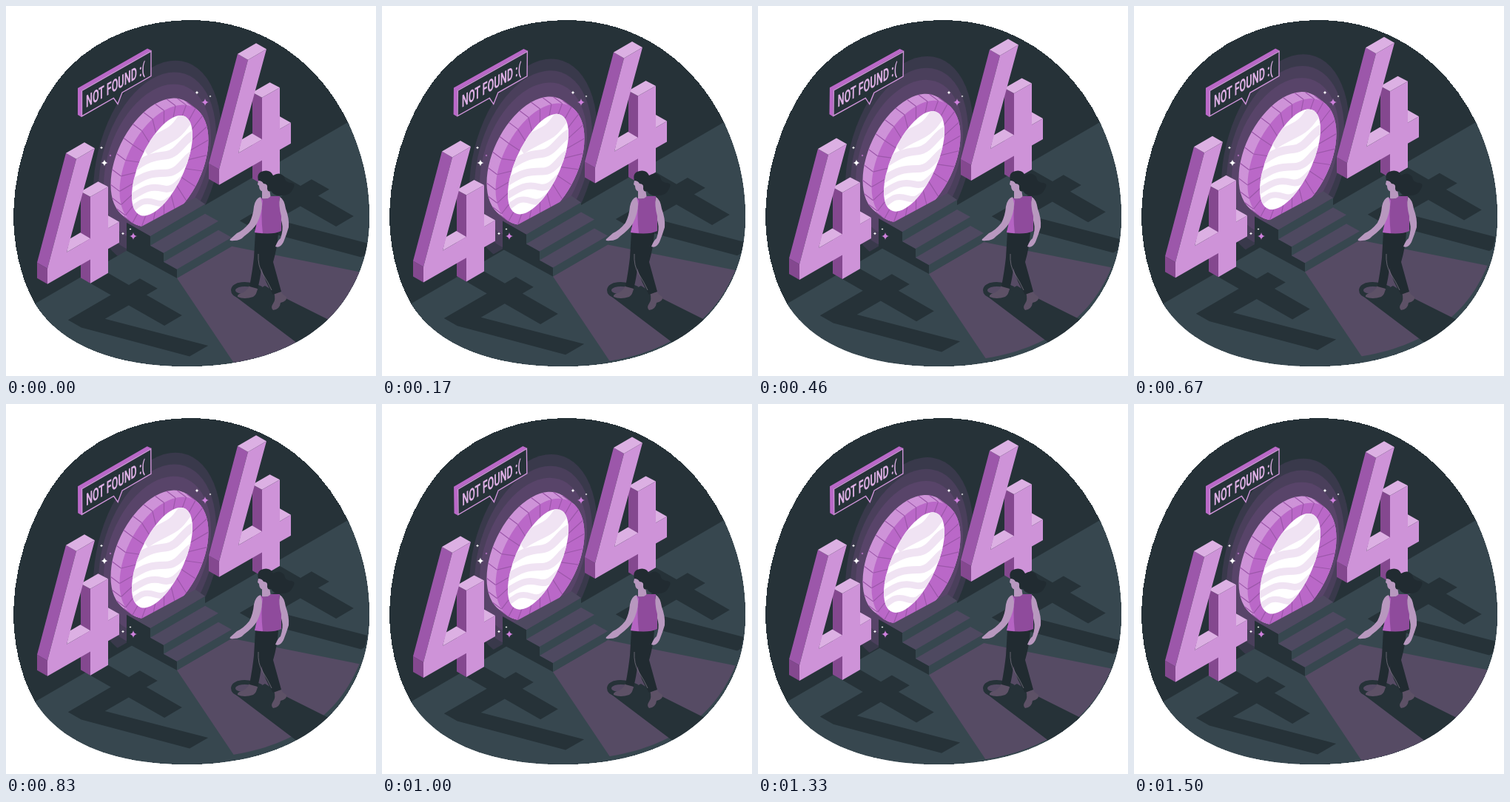
An HTML page that plays this animation: 500 by 500 pixels, repeating every 1.54 s.

```html
<!DOCTYPE html>
<html lang="en">
<head>
<meta charset="utf-8">
<title>404 Not Found</title>
<style>
  html, body { margin: 0; width: 100%; height: 100%; overflow: hidden; background: #fff; }
  svg { display: block; width: 100vw; height: 100vh; }
  text { font: 700 23px Roboto, sans-serif; fill: #ddafe4; }
  .dark { fill: #263238; }
  .floor { fill: #37474f; }
  .lit { fill: #564b64; }
  .tread { fill: #4e4960; }
  .top { fill: #dcb0e3; }
  .front { fill: #ce93d8; }
  .side { fill: #9c57aa; }
  .deep { fill: #84488f; }
  .skin { fill: #b898bf; }
  .hair { fill: #212b31; }
  .seam { fill: none; stroke: #9c57aa; stroke-width: 1.2; }
  .wave { fill: none; stroke: #f0e3f3; }
</style>
</head>
<body>
<svg viewBox="0 0 500 500">
  <defs>
    <path id="blob" d="M250 19C350 19 425 80 462 157C482 200 491 240 491 285C491 330 480 360 462 390C425 450 350 487 245 487C150 487 75 460 39 402C18 365 10 320 10 280C12 200 45 125 85 83C130 38 190 19 250 19Z"/>
    <clipPath id="inBlob"><use href="#blob"/></clipPath>
    <clipPath id="wall"><path d="M0 0H500V136L0 425Z"/></clipPath>
    <clipPath id="opening"><ellipse rx="41" ry="54" transform="translate(211 216) skewY(-45)"/></clipPath>
    <path id="fourFace" d="M56 376V355L95 207L120 192.5L82 333L114 314.5V258L138 244.5V300.6L153 292V320L138 328.5V361L114 375V342.7Z"/>
    <g id="four">
      <path class="deep" d="M101 251L114 258V375L101 367.5ZM42 347L56 355V376L42 368Z"/>
      <path class="side" d="M81 199L95 207L56 355L42 347Z"/>
      <path class="top" d="M81 199L106 184.5L120 192.5L95 207ZM101 251L124.5 237.5L138 244.5L114 258ZM82 333L114 314.5L100.5 306.5L86 315ZM138 300.6V283.5L153 292Z"/>
      <use href="#fourFace" class="front"/>
    </g>
    <use id="fourShadow" href="#fourFace" class="dark" transform="matrix(.507 -.86 -.855 -.49 376.9 656.8)"/>
    <path id="star" d="M0-1Q.15-.15 1 0Q.15.15 0 1Q-.15.15-1 0Q-.15-.15 0-1Z"/>
  </defs>

  <use href="#blob" class="dark" shape-rendering="crispEdges"/>
  <g clip-path="url(#inBlob)">
    <path class="floor" d="M0 425L500 135V500H0Z"/>
  </g>

  <g id="scene">
    <g clip-path="url(#inBlob)">
      <path class="lit" d="M231 368L305 325L520 368V520H333Z"/>
      <use href="#fourShadow"/>
      <use href="#fourShadow" x="232" y="-134"/>
    </g>
    <g clip-path="url(#wall)" fill="#ba68c8" fill-opacity=".13" id="halo"></g>
    <g id="portal"></g>
    <g clip-path="url(#opening)">
      <path fill="#fff" d="M160 130H260V300H160Z"/>
      <g class="wave">
        <path stroke-width="20" d="M256 144C236 152 240 164 222 174S200 184 186 194"/>
        <path stroke-width="11" d="M258 172C240 178 234 200 216 202S190 206 168 222"/>
        <path stroke-width="10" d="M258 198C240 204 236 226 216 226S188 228 164 244"/>
        <path stroke-width="9" d="M256 224C236 228 232 252 212 247S184 250 164 262"/>
        <path stroke-width="8" d="M240 252C222 254 220 272 202 266S180 268 166 278"/>
      </g>
    </g>
    <path class="dark" d="M163 293L195 311V324L213 334V346L231 356V368L163 331Z"/>
    <path class="floor" d="M195 311L269 268V281L195 324ZM213 334L287 291V303L213 346ZM231 356L305 313V325L231 368Z"/>
    <path class="tread" d="M178 301L256 259L269 268L195 311ZM195 324L269 281L287 291L213 334ZM213 346L287 303L305 313L231 356Z"/>
    <use href="#four"/>
    <use href="#four" x="232" y="-134"/>
  </g>

  <g id="stars"></g>

  <g id="sign">
    <path fill="#ba68c8" d="M97 111L191 57.5L196.5 60L102 114V150L97 147Z"/>
    <path class="dark" stroke="#ce93d8" stroke-width="1.4" d="M102.5 114.5L196 61V94.5L157 117L151 132.5L145.5 124.5L102.5 149Z"/>
    <text transform="matrix(.55 -.318 0 1 108 137.5)">NOT FOUND :(</text>
  </g>

  <g clip-path="url(#inBlob)">
    <path class="dark" d="M308 391L328 390L350 378L376 394L442 427L398 459Z"/>
    <path d="M345 382C325 372 307 376 307 384S320 393 336 393" fill="none" stroke="#263238" stroke-width="6"/>
  </g>

  <g id="woman">
    <path fill="#5d5166" d="M329 378L340 381Q339 390 334 393Q322 397 313 393Q312 390 318 388Q325 386 329 378ZM362 387L371 384Q373 390 379 393Q380 399 371 401Q370 410 361 411Q357 408 361 402Q365 397 362 387Z"/>
    <path class="hair" d="M337 305L368 306Q367 325 361 346L372 386L361 390Q350 373 345 354Q344 367 340 382L329 379Q333 358 335 340Z"/>
    <path d="M341 335Q340 351 347 362T359 384" fill="none" stroke="#77717f" stroke-width=".8"/>
    <path class="skin" d="M370 258Q376 261 378 274Q383 287 382 299Q379 309 375 319Q370 328 364 325Q367 317 371 314Q375 302 373 294L368 272Z"/>
    <path class="skin" d="M346 248L356 248L358 260L346 261Z"/>
    <path fill="#8f4b9c" d="M344 259Q352 263 358 257L370 257Q368 270 372 284V304Q360 310 336 306Q341 288 340 272Z"/>
    <path fill="#b564c3" d="M344 259L347 263Q344 281 347 307L336 306Q341 288 340 272Z"/>
    <path class="skin" d="M344 258Q337 260 335 271Q334 283 329 293Q321 303 312 307L303 315Q301 318 308 317Q317 317 322 311Q334 302 339 294Q346 280 346 267Z"/>
    <path class="skin" d="M342 231L352 231L355 247Q351 252 345 250Q342 248 342 243L340 241Z"/>
    <path class="hair" d="M341 236Q338 225 348 223Q357 221 361 229Q370 223 376 231Q377 239 386 239Q392 240 388 247Q384 256 374 256Q363 258 358 250Q354 252 353 247Q354 240 348 240Q346 236 341 236Z"/>
    <ellipse class="skin" cx="351" cy="244" rx="1.8" ry="2.8"/>
  </g>
</svg>
<script>
  const $ = id => document.getElementById(id);
  const LOOP = 1540, CYCLE = 1500, LEAD = 20;
  const SEGMENTS = 24;
  const cx = 213.5, cy = 216, rx = 60, ry = 74.5;
  const depth = { x: -12, y: -9 };

  const oval = (x, y, a, b, fill = '', skew = -30) =>
    `<ellipse rx="${a}" ry="${b}" ${fill && `fill="${fill}"`} transform="translate(${x} ${y}) skewY(${skew})"/>`;

  $('halo').innerHTML = [[86.5, 131.5], [79.5, 116], [72.5, 100]]
    .map(([a, b]) => oval(204.5, 211, a, b, '', -24)).join('');

  // The rim is the front oval swept backwards; seams hidden by the front are painted over.
  let rim = '', rimSeams = '', faceSeams = '';
  for (let i = 12; i >= 0; i--)
    rim += oval(cx + depth.x * i / 12, cy + depth.y * i / 12, rx, ry, '#ce93d8');
  for (let i = 0; i < SEGMENTS; i++) {
    const a = i / SEGMENTS * 2 * Math.PI;
    const x = cx + rx * Math.cos(a);
    const y = cy + ry * Math.sin(a) - rx * Math.cos(a) * Math.tan(Math.PI / 6);
    rimSeams += `M${x} ${y}l${depth.x} ${depth.y}`;
    faceSeams += `M${cx} ${cy}L${x} ${y}`;
  }
  $('portal').innerHTML = rim + `<path class="seam" d="${rimSeams}"/>` +
    oval(cx, cy, rx, ry, '#ba68c8') + `<path class="seam" d="${faceSeams}"/>`;

  const white = '#fff', purple = '#ce80dc';
  $('stars').innerHTML = [
    [133, 212, 4.5, white], [129, 191.5, 2, white], [141, 202, 1.5, purple],
    [258, 117, 2.5, white], [269, 130, 5, purple], [276, 122, 1.5, white],
    [172, 311, 5, purple], [158, 307.5, 2, white], [168, 301.5, 1.5, white]
  ].map(([x, y, r, fill]) =>
    `<use href="#star" fill="${fill}" transform="translate(${x} ${y}) scale(${r})"/>`).join('');

  // Linear wave between -1 and 1, starting at 0 and rising.
  const triangle = p => 1 - 4 * Math.abs((p + .25) % 1 - .5);

  function draw() {
    const p = (performance.now() - start) % LOOP;
    const phase = (p + LEAD) / CYCLE % 1;
    const lift = 9.5 * (1 - Math.abs(1 - 2 * phase));
    $('scene').setAttribute('transform', `translate(0 ${-lift})`);
    $('sign').setAttribute('transform', `rotate(${triangle(phase)} 147 105)`);
    requestAnimationFrame(draw);
  }
  const start = performance.now();
  draw();
</script>
</body>
</html>
```
